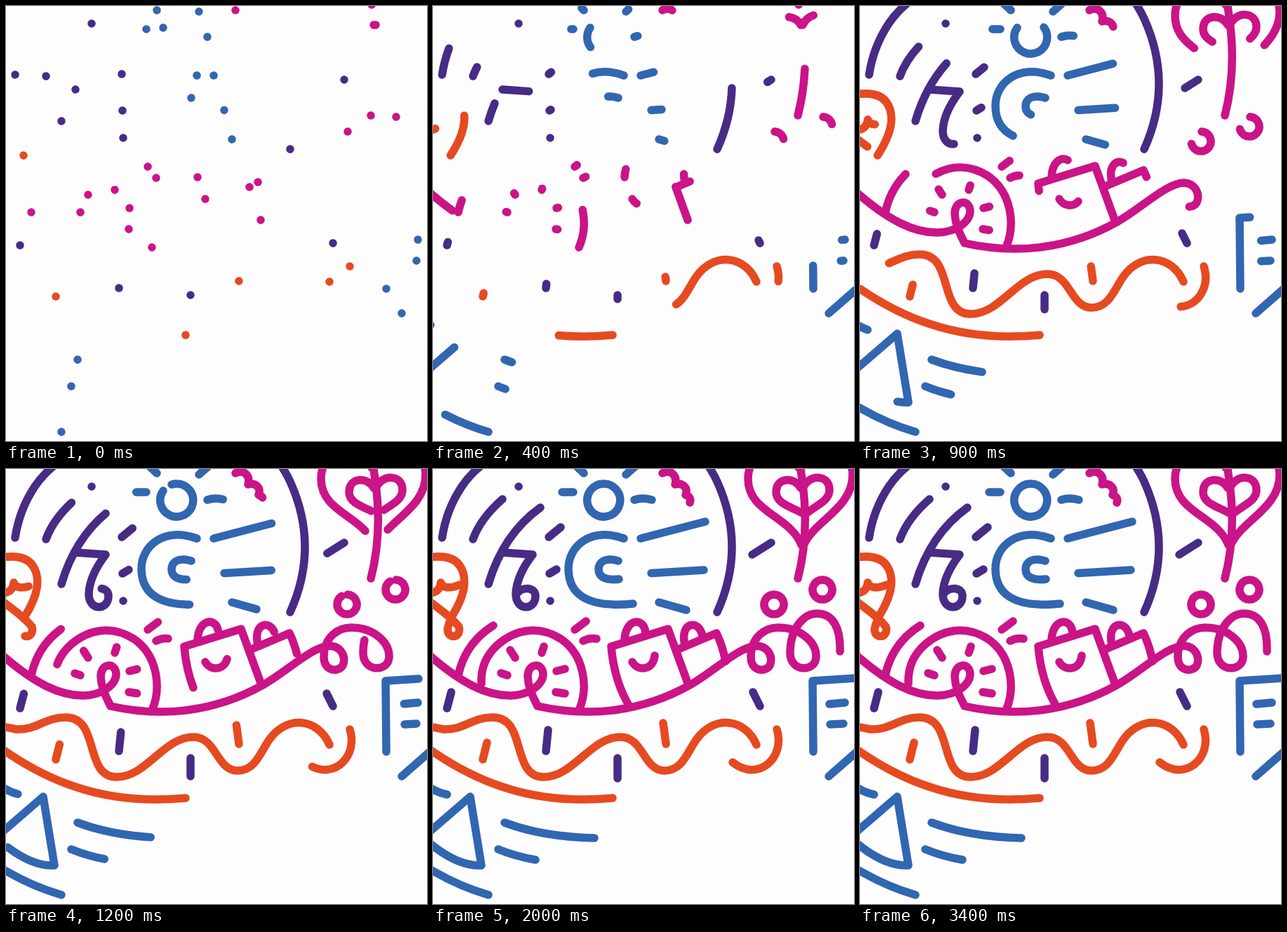
Write an HTML page that moves like this. It is 600 by 620 pixels and loops after 3.5 s.

```html
<!DOCTYPE html>
<html lang="en">
<head>
<meta charset="utf-8">
<title>Line drawing</title>
<style>
  html, body { margin: 0; width: 100%; height: 100%; overflow: hidden; background: #fefdfe; }
  svg { display: block; fill: none; stroke-width: 11.500; stroke-linecap: round; stroke-linejoin: round; }
</style>
</head>
<body>
<svg width="600" height="620" viewBox="0 0 600 620">
  <g stroke="#472b85">
    <!-- head outline and hair -->
    <path d="M13 98Q19 58 41 25Q70 -18 135 -40"/>
    <path d="M405 204Q447 111 405 18Q385 -27 250 -190"/>
    <path d="M57 100Q68 70 99 43"/>
    <path d="M79 164Q100 93 153 55"/>
    <path d="M99 119L142 122Q119 152 118 178C118 203 146 202 146 181C146 168 127 167 119 178"/>
    <path d="M122 25h.1"/>
    <path d="M167 188h.1"/>
    <path d="M165 97L182 83"/>
    <path d="M166 149L176 143"/>
    <!-- sprinkles -->
    <path d="M482 105L455 122"/>
    <path d="M20 341L26 318"/>
    <path d="M161 402L164 372"/>
    <path d="M263 412V441"/>
    <path d="M466 338L456 318"/>
  </g>
  <g stroke="#3166b1">
    <!-- sun -->
    <path d="M224 31A23.5 23.5 0 1 0 243 21A23.5 23.5 0 0 0 224 31"/>
    <path d="M215 6L199 -9"/>
    <path d="M275 8L293 -8"/>
    <path d="M200 33H184"/>
    <path d="M287 44Q298 40 312 44"/>
    <!-- lamp and beams -->
    <path d="M272 99C225 82 193 110 193 142C193 175 215 199 285 192"/>
    <path d="M264 131C245 125 236 133 236 143C236 155 248 159 265 157"/>
    <path d="M296 99L388 75"/>
    <path d="M311 148.500L386 144"/>
    <path d="M322 190L361 201"/>
    <!-- page -->
    <path d="M542 403L541 302L605 298"/>
    <path d="M587 333L565 335"/>
    <path d="M585 363L566 364"/>
    <path d="M564 438L604 403L750 270"/>
    <!-- arrow and trails -->
    <path d="M-13 524L53 467L69 565Q30 567 -20 520"/>
    <path d="M-9 451Q5 461 20 464"/>
    <path id="trail" d="M102 504Q155 524 230 526"/>
    <path d="M93 542Q117 552 146 557"/>
    <path d="M79 607Q40 596 0 573L-215 450"/>
  </g>
  <g stroke="#ca1487">
    <path d="M327 6C337 0 349 8 345 22C356 19 364 27 360 37C366 39 368 43 366 48"/>
    <!-- leaf -->
    <path d="M520 156Q537 90 526 15L500 -180"/>
    <path d="M524 27C516 11 489 11 489 33C489 50 512 54 530 65"/>
    <path d="M527 27C537 6 565 8 565 30C565 46 545 52 530 65"/>
    <path d="M521 -2C505 -40 449 -32 449 14C449 62 508 66 525 108"/>
    <path d="M521 -2C540 -38 598 -32 598 8C598 55 547 72 530 105"/>
    <!-- people -->
    <path d="M556 158A14 14 0 1 1 554 158Z"/>
    <path d="M487 179A14 14 0 1 1 485 179Z"/>
    <path d="M-158 128L0 270C40 304 75 323 110 323C140 322 157 306 157 292C156 275 135 276 135 296C136 314 143 325 149 338C225 355 300 345 366 308C400 289 437 252 462 252C478 253 485 268 480 280C474 290 453 289 453 268C453 238 475 226 492 226C525 226 547 248 546 268C545 290 509 290 509 262C509 225 530 206 547 206C570 206 581 226 580 260"/>
    <!-- bags -->
    <path d="M363 305L335 228L254 253Q258 300 278 335"/>
    <path d="M273 244C274 212 302 210 303 235"/>
    <path d="M284 275C292 289 314 287 316 266"/>
    <path d="M347 258L404 234Q412 250 417 274"/>
    <path d="M359 251C351 218 379 213 384 238"/>
    <path d="M202 229L218 217"/>
    <path d="M214 245Q223 240 233 242"/>
    <!-- fruit slice -->
    <path d="M208 344C222 312 216 265 182 242C150 222 118 229 94 249C75 265 68 285 69 306"/>
    <path d="M36 294Q46 248 86 223"/>
    <path d="M155 262L158 253"/>
    <path d="M117 269L110 258"/>
    <path d="M106 294L97 291"/>
    <path d="M176 288L188 285"/>
    <path d="M175 318L188 320"/>
  </g>
  <g stroke="#e64a21">
    <!-- ice cream -->
    <path d="M25 213C38 193 49 168 43 148C37 128 20 122 -5 126L-180 160"/>
    <path d="M-8 177C4 177 10 172 11 162C14 170 24 171 38 165"/>
    <path d="M-150 78L2 194Q28 213 37 225C41 242 19 243 21 227Q23 219 26 212"/>
    <!-- waves -->
    <path d="M461 393C445 355 400 350 375 386C362 405 355 430 330 430C300 430 300 382 267 382C225 382 200 439 158 439C110 439 135 354 85 354C55 354 45 372 15 371L-190 330"/>
    <path d="M256 469Q170 477 99 453Q50 437 0 403L-95 338"/>
    <path d="M490 371C503 412 463 447 427 418"/>
    <path d="M71 414L77 390"/>
    <path d="M332 392L328 362"/>
  </g>
</svg>
<script>
const LOOP = 3500, STEP = 100, DRAW = 1667, TRAIL_DELAY = 140;
const svg = document.querySelector('svg');
const trail = document.getElementById('trail');
for (const path of svg.querySelectorAll('path')) path.setAttribute('pathLength', 1);

// Cubic ease (.31, 0, .46, 1), solved for time by bisection.
function ease(x) {
  if (x <= 0) return 0;
  if (x >= 1) return 1;
  let low = 0, high = 1, s;
  for (let i = 0; i < 24; i++) {
    s = (low + high) / 2;
    const time = .93 * s * (1 - s) ** 2 + 1.38 * s * s * (1 - s) + s ** 3;
    if (time < x) low = s; else high = s;
  }
  return s * s * (3 - 2 * s);
}

function reveal(element, time) {
  const drawn = ease(time / DRAW);
  element.style.strokeDasharray = drawn === 1 ? 'none' : `${Math.max(drawn, .0001)} 2`;
}

const start = performance.now();
function draw() {
  const elapsed = (performance.now() - start) % LOOP;
  const time = Math.floor(elapsed / STEP) * STEP;
  reveal(svg, time);
  reveal(trail, time - TRAIL_DELAY);
  requestAnimationFrame(draw);
}
draw();
</script>
</body>
</html>
```
